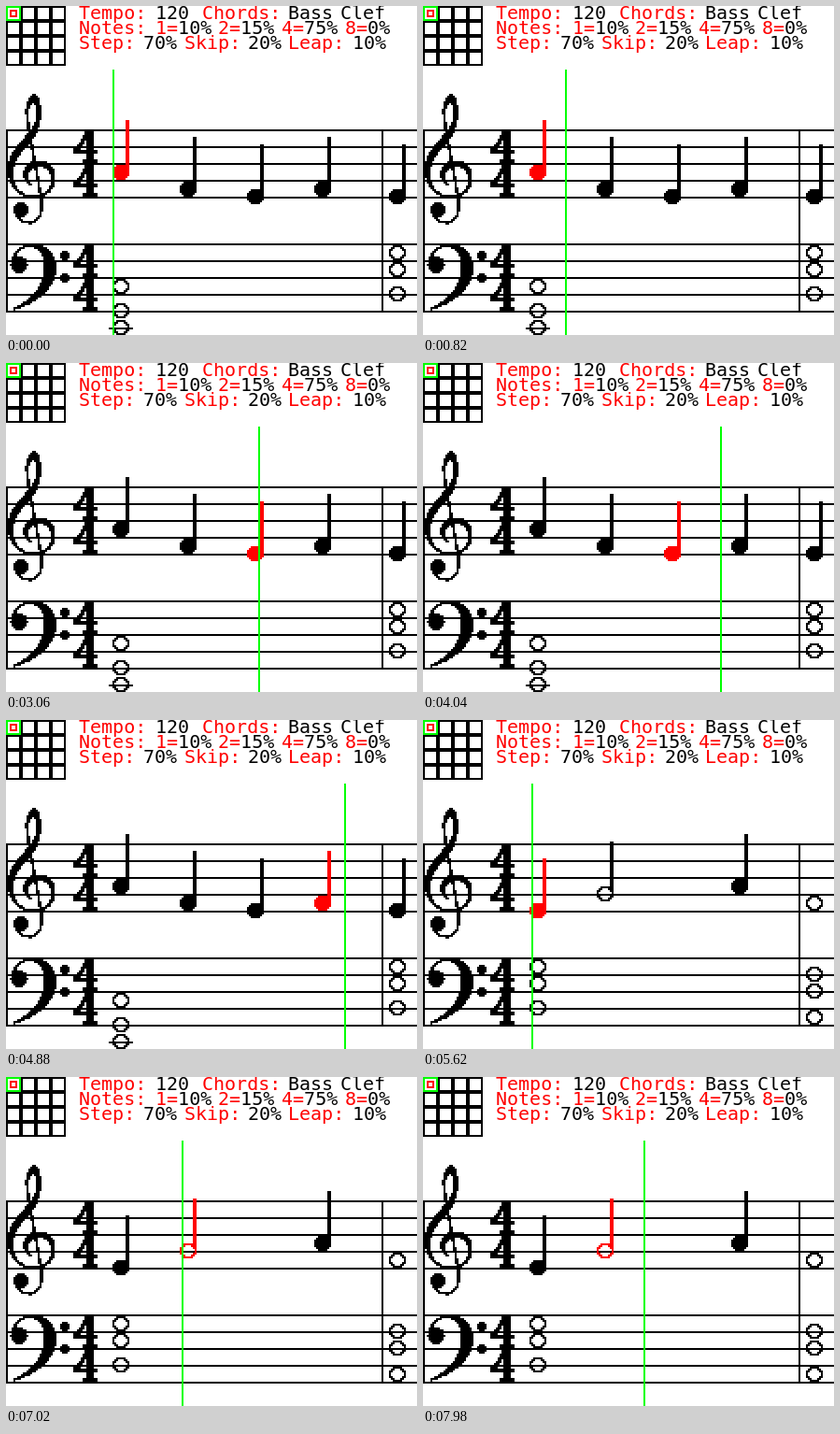
Recreate the animation shown at these times as an HTML page with a canvas. Size 440 by 352 pixels, loop 8000 ms.

```html
<!DOCTYPE html>
<html lang="en">
<head>
<meta charset="utf-8">
<title>Sight reading</title>
<style>
  html, body { margin: 0; width: 100%; height: 100%; overflow: hidden; background: #fff; }
  canvas, svg { position: absolute; left: 0; top: 0; width: 440px; height: 352px; }
  canvas { image-rendering: pixelated; }
  text { font: 20px "DejaVu Sans Mono", "Liberation Mono", monospace; fill: #f00; }
  .v { fill: #000; }
</style>
</head>
<body>
<canvas id="score" width="220" height="176"></canvas>
<svg viewBox="0 0 440 352">
  <text y="14"><tspan x="78">Tempo:</tspan><tspan x="160" class="v">120</tspan><tspan x="210">Chords:</tspan><tspan x="302" class="v">Bass</tspan><tspan x="358" class="v">Clef</tspan></text>
  <text y="30"><tspan x="78">Notes:</tspan><tspan x="160">1=</tspan><tspan class="v">10%</tspan><tspan x="227">2=</tspan><tspan class="v">15%</tspan><tspan x="295">4=</tspan><tspan class="v">75%</tspan><tspan x="363">8=</tspan><tspan class="v">0%</tspan></text>
  <text y="46"><tspan x="78">Step:</tspan><tspan x="147" class="v">70%</tspan><tspan x="191">Skip:</tspan><tspan x="259" class="v">20%</tspan><tspan x="302">Leap:</tspan><tspan x="371" class="v">10%</tspan></text>
</svg>
<script>
const W = 220, H = 176, LOOP = 8000;
const FIRST_X = 57, BEAT = 36, MEASURE = 4 * BEAT;
const TREBLE = 102.5, BASS = 163.5, STEP = 4.5;

const newCanvas = () => Object.assign(document.createElement('canvas'), { width: W, height: H });
const screen = document.getElementById('score').getContext('2d');
const ink = newCanvas().getContext('2d', { willReadFrequently: true });

// Draws one colour on the coarse grid, with hard pixel edges.
function paint(target, color, draw) {
  ink.clearRect(0, 0, W, H);
  ink.fillStyle = ink.strokeStyle = color;
  draw();
  const image = ink.getImageData(0, 0, W, H);
  for (let i = 3; i < image.data.length; i += 4) image.data[i] = image.data[i] > 120 ? 255 : 0;
  ink.putImageData(image, 0, 0);
  target.drawImage(ink.canvas, 0, 0);
}

const rect = (x, y, w, h) => ink.fillRect(x, y, w, h);
const frame = (x, y, s) => { ink.lineWidth = 1; ink.strokeRect(x + .5, y + .5, s - 1, s - 1); };
const shape = d => ink.fill(new Path2D(d));
const line = (d, w) => { ink.lineWidth = w; ink.stroke(new Path2D(d)); };

function oval(x, y, rx, ry, filled) {
  ink.beginPath();
  ink.ellipse(x, y, rx, ry, 0, 0, 7);
  ink.lineWidth = 1.25;
  filled ? ink.fill() : ink.stroke();
}

// kind: 4 quarter, 2 half, 1 whole
function note(x, y, kind) {
  if (kind === 4) oval(x + 4.5, y, 4.5, 4, true);
  else oval(x + 4.5, y, 4, 3.5, false);
  if (kind > 1) rect(x + 7, y - 28, 2, 27);
}

function four(y) {
  shape(`M43 ${y} H47 V${y + 4} H44 L39 ${y + 12} H36 V${y + 11} Q41 ${y + 6} 43 ${y}Z`);
  rect(36, y + 11, 13, 2);
  rect(43, y + 3, 4, 14);
  rect(41, y + 16, 8, 2);
}

function trebleClef() {
  shape('M10.5 58 C10 51 13 47 15.5 46.5 C19 50 20 58 18 63 C16 67 13 70 10 72 L9.5 70 ' +
        'C14 66 17 61 16.5 56 C16.3 53 15 52 14.5 52 C12 53 11.5 58 12.5 64 L11.5 65Z');
  shape('M18 60 C17 65 14 68 11 70 C4 76 1 81 1 88 C1 97 8 103 15 103 C22 103 26.5 98 26.5 92 ' +
        'C26.5 86 22.5 82.5 18 82.5 C13 82.5 9 86 9 90 C9 93.5 12 96 15 97 C13 95 12 93 12 91 ' +
        'C12 87.5 15 86 18 86 C22 86 24 89 24 93 C24 98 20 101.5 15 101.5 C9 101.5 4 97 4 90 ' +
        'C4 83 8 78.5 13 73 C17 69 18 65 18 60Z');
  line('M11.5 60 Q12 65 13 70 L19 104 Q20 115 13 116 Q8 116 6 112', 1.4);
  oval(8, 109, 4, 4, true);
}

function bassClef() {
  shape('M3 137 C3 130 9 127.5 14 127.5 C22 127.5 27 132 27 140 C27 151 17 159 4 163 L3.5 162 ' +
        'C14 157 20.5 150 20.5 139.5 C20.5 132.5 17.5 129 13 129 C8.5 129 5 132 4.5 137Z');
  oval(7, 138.5, 4.6, 4.6, true);
  oval(31.5, 133.5, 2.7, 2.7, true);
  oval(31.5, 145.5, 2.7, 2.7, true);
}

// Melody entries: [beat, staff step, kind]
const PAGES = [
  { melody: [[0, 3, 4], [1, 1, 4], [2, 0, 4], [3, 1, 4], [4, 0, 4]], chords: [[3, 0, -2], [7, 5, 2]] },
  { melody: [[0, 0, 4], [1, 2, 2], [3, 3, 4], [4, 1, 1]], chords: [[7, 5, 2], [6, 4, 1]] }
];
const noteX = beat => FIRST_X + beat * BEAT + (beat > 3 ? 4 : 0);
const noteY = (base, step) => Math.floor(base - step * STEP);
const drawMelody = ([beat, step, kind]) => note(noteX(beat), noteY(TREBLE, step), kind);

const backdrop = newCanvas().getContext('2d');
backdrop.fillStyle = '#fff';
backdrop.fillRect(0, 0, W, H);
paint(backdrop, '#000', () => {
  for (let cell = 0; cell < 16; cell++) frame(cell % 4 * 8, Math.floor(cell / 4) * 8, 8);
  for (let i = 0; i < 5; i++) {
    rect(0, 66 + 9 * i, W, 1);
    rect(0, 127 + 9 * i, W, 1);
  }
  rect(0, 66, 1, 98);
  rect(201, 66, 1, 98);
  [66, 84, 127, 145].forEach(four);
  trebleClef();
  bassClef();
});
paint(backdrop, '#0f0', () => frame(0, 0, 8));
paint(backdrop, '#f00', () => frame(2, 2, 4));

// Three ticks per 140 ms; the playhead skips a beat of its step every 56 ticks.
function tickAt(t) {
  const part = t % 140;
  return 3 * Math.floor(t / 140) + (part >= 120 ? 2 : part >= 20 ? 1 : 0);
}
const travelAt = tick => Math.floor(.18 + (tick - Math.floor((tick + 40) / 56)) * 11 / 9);

function render(tick) {
  const travel = travelAt(tick);
  const pageIndex = Math.floor(travel / MEASURE);
  const head = travel % MEASURE;
  const { melody, chords } = PAGES[pageIndex];
  const active = melody.filter(n => n[0] * BEAT <= head).pop();

  screen.drawImage(backdrop.canvas, 0, 0);
  paint(screen, '#000', () => {
    melody.filter(n => n !== active).forEach(drawMelody);
    chords.forEach((steps, i) => steps.forEach(step => {
      note(noteX(4 * i), noteY(BASS, step), 1);
      if (step === -2) rect(55, 172, 13, 1);
    }));
  });
  paint(screen, '#f00', () => drawMelody(active));
  screen.fillStyle = '#0f0';
  screen.fillRect(FIRST_X + head, 34, 1, H - 34);
}

const start = performance.now();
let shown = -1;
function loop() {
  const tick = tickAt((performance.now() - start) % LOOP);
  if (tick !== shown) render(shown = tick);
  requestAnimationFrame(loop);
}
loop();
</script>
</body>
</html>
```
